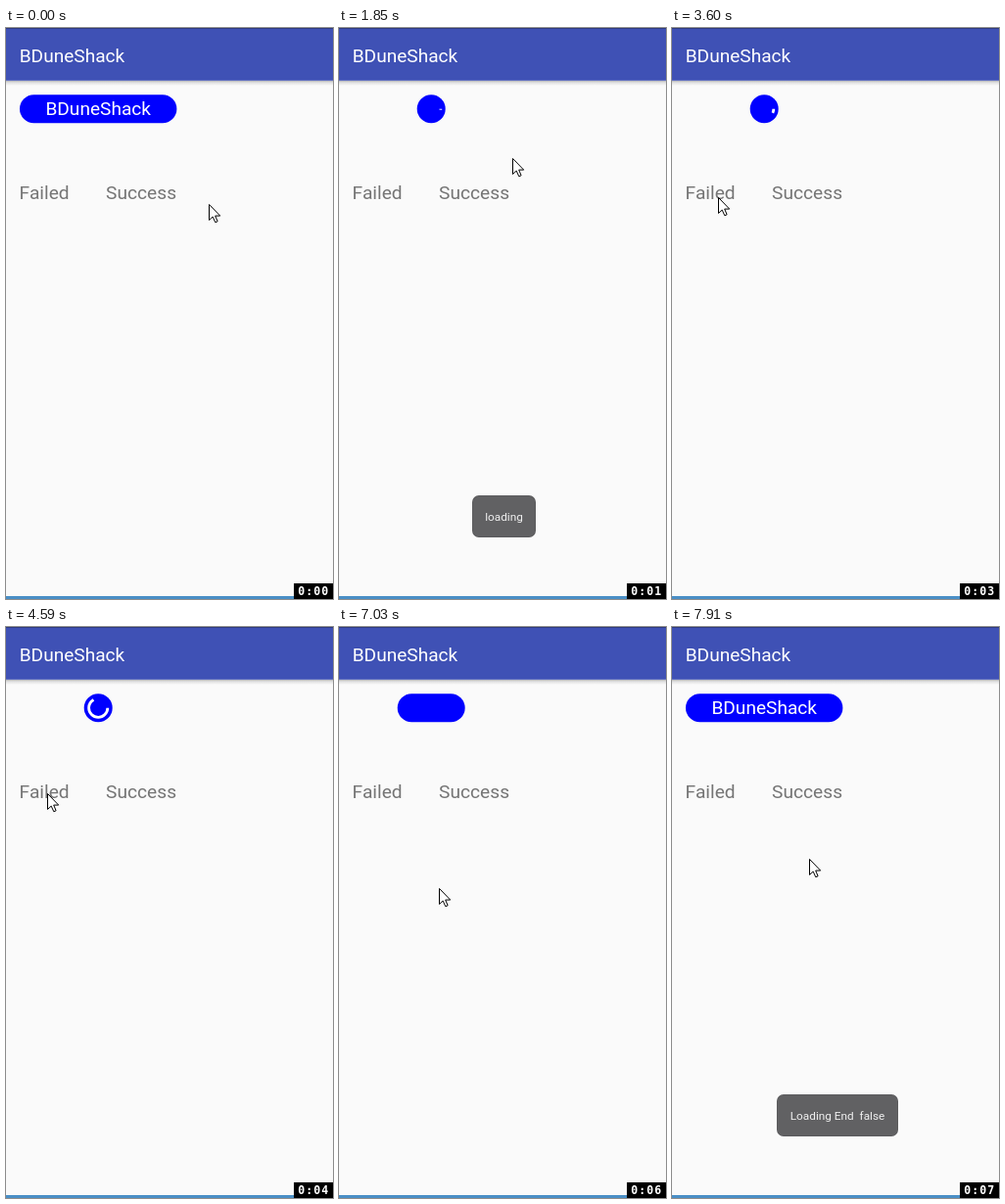
Animation of 334x584 px, one loop 8000 ms. Source, as an HTML page with a canvas:

```html
<!DOCTYPE html>
<html lang="en">
<head>
<meta charset="utf-8">
<title>Loading button</title>
<style>
html, body { margin: 0; width: 100%; height: 100%; overflow: hidden; background: #fafafa; }
canvas { display: block; width: 100vw; height: 100vh; }
</style>
</head>
<body>
<canvas id="stage" width="334" height="584"></canvas>
<script>
const W = 334, H = 584, LOOP = 8000;
const LABEL = 'BDuneShack', LABEL_SIZE = 19.1;
const ctx = document.getElementById('stage').getContext('2d');

// Pointer tip: [time, x, y]
const POINTER = [
  [120, 207, 180], [540, 147, 87], [1200, 147, 87], [1850, 177, 133],
  [2050, 172, 140], [2910, 64, 168], [3350, 47, 173], [3980, 46, 172],
  [4350, 38, 171], [4800, 46, 170], [6720, 46, 170], [7030, 102, 267],
  [7300, 120, 262], [7600, 140, 237]
];

const SHRINK = [940, 1835], GROW = [6774, 7465];
const SPIN_START = 1830, SPIN_PERIOD = 1655;

const clamp = x => Math.min(1, Math.max(0, x));
const ease = x => (1 - Math.cos(Math.PI * clamp(x))) / 2;
const progress = (t, [a, b]) => ease((t - a) / (b - a));

function pointerAt(t) {
  let prev = POINTER[0];
  for (const next of POINTER) {
    if (t < next[0]) {
      const k = next === prev ? 0 : ease((t - prev[0]) / (next[0] - prev[0]));
      return [prev[1] + (next[1] - prev[1]) * k, prev[2] + (next[2] - prev[2]) * k];
    }
    prev = next;
  }
  return prev.slice(1);
}

function rect(x, y, w, h, color) {
  ctx.fillStyle = color;
  ctx.fillRect(x, y, w, h);
}

function pill(x, y, w, h, r, color) {
  ctx.fillStyle = color;
  ctx.beginPath();
  ctx.roundRect(x, y, w, h, r);
  ctx.fill();
}

function text(str, x, y, size, color, align = 'left') {
  ctx.font = size + 'px Roboto, sans-serif';
  ctx.textAlign = align;
  ctx.fillStyle = color;
  ctx.fillText(str, x, y);
}

function drawScreen() {
  rect(0, 0, W, H, '#fafafa');
  const shadow = ctx.createLinearGradient(0, 54, 0, 59);
  shadow.addColorStop(0, 'rgba(0,0,0,.26)');
  shadow.addColorStop(0.35, 'rgba(0,0,0,.1)');
  shadow.addColorStop(1, 'rgba(0,0,0,0)');
  rect(0, 54, W, 5, shadow);
  rect(0, 0, W, 53.8, '#3f51b5');
  rect(0, 0, W, 1, '#2f3b80');
  rect(0, 581, W, 3, '#4a8fc6');
  text(LABEL, 13.7, 34.5, LABEL_SIZE, '#fff');
  text('Failed', 13.6, 174.8, 19.2, '#757575');
  text('Success', 102, 174.8, 19.2, '#757575');
}

function drawButton(t) {
  const cx = 94.2, cy = 82.8, small = 29;
  const growing = t >= GROW[0];
  const open = growing ? progress(t, GROW) : 1 - progress(t, SHRINK);
  const w = small + (160.4 - small) * open;
  pill(cx - w / 2, cy - small / 2, w, small, small / 2, '#0000ff');

  const labelSize = LABEL_SIZE * open;
  if (labelSize > 1 && (!growing || open === 1)) {
    text(LABEL, cx, cy + 0.35 * labelSize, labelSize, '#fff', 'center');
  }
  if (t >= SPIN_START && !growing) {
    const turn = (t - SPIN_START) / SPIN_PERIOD % 1;
    ctx.strokeStyle = '#fff';
    ctx.lineWidth = 2.8;
    ctx.beginPath();
    ctx.arc(cx, cy, 9.6, 0, turn * 2 * Math.PI);
    ctx.stroke();
  }
}

function drawToast(t, str, x, w, start, end) {
  const fade = 160;
  const shown = ease((t - start) / fade) * (1 - ease((t - end) / fade));
  if (shown <= 0) return;
  ctx.save();
  ctx.globalAlpha = shown;
  ctx.translate(0, 48 * (1 - shown));
  pill(x, 478, w, 43, 7, '#59595b');
  pill(x + 0.7, 478.7, w - 1.4, 41.6, 6.5, '#616163');
  text(str, x + w / 2, 503.7, 11.8, '#f0f0f0', 'center');
  ctx.restore();
}

function drawClock(t) {
  const second = Math.floor(Math.max(0, t - 50) / 1000);
  rect(294, 568, 40, 16, '#000');
  ctx.font = 'bold 11.5px "DejaVu Sans Mono", monospace';
  ctx.textAlign = 'center';
  ctx.fillStyle = '#fff';
  [...'0:0' + second].forEach((ch, i) => ctx.fillText(ch, 301.7 + 8 * i, 579.6));
}

function drawPointer(t) {
  const [x, y] = pointerAt(t).map(Math.round);
  ctx.save();
  ctx.translate(x + 0.5, y + 0.5);
  const arrow = new Path2D('M0 0V16L3.7 12.6L6.3 18.3L8.6 17.3L6.2 11.6H11.2Z');
  ctx.fillStyle = '#fff';
  ctx.fill(arrow);
  ctx.strokeStyle = '#000';
  ctx.lineWidth = 1;
  ctx.stroke(arrow);
  ctx.restore();
}

function draw(t) {
  drawScreen();
  drawButton(t);
  drawToast(t, 'loading', 136, 65, 1068, 3060);
  drawToast(t, 'Loading End \u00a0false', 107, 124, 7480, 9500);
  drawClock(t);
  drawPointer(t);
}

const began = performance.now();
function tick() {
  draw((performance.now() - began) % LOOP);
  requestAnimationFrame(tick);
}
tick();
</script>
</body>
</html>
```
